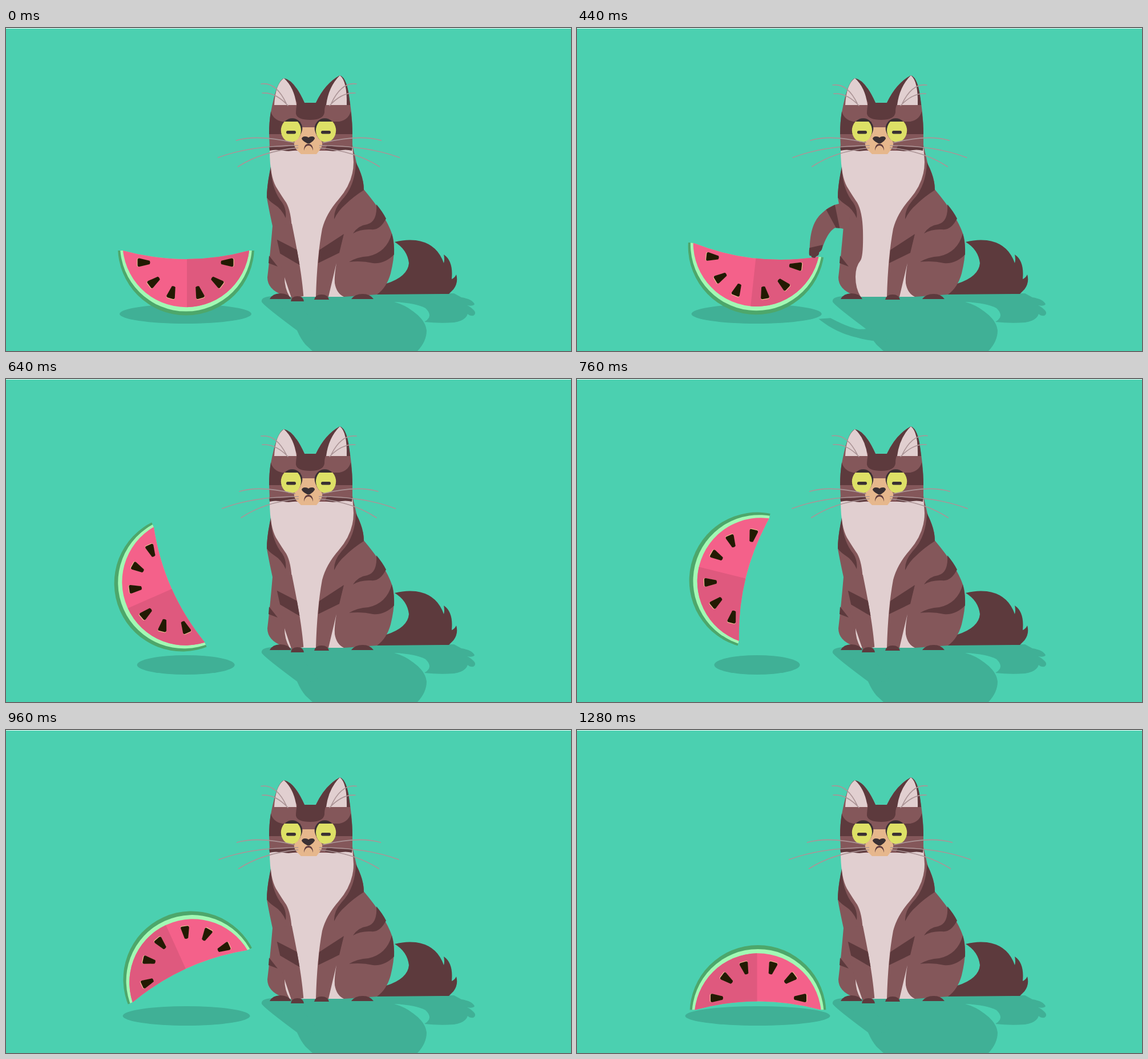
Animation of 990x566 px, one loop 1.6 s. Source, as an HTML page:

```html
<!DOCTYPE html>
<html lang="en">
<head>
<meta charset="utf-8">
<title>Cat and melon</title>
<style>
html, body { margin: 0; width: 100%; height: 100%; overflow: hidden; background: #4bd0b0; }
svg { display: block; width: 100vw; height: 100vh; }
.mid { fill: #84575a; }
.dark { fill: #5d3a3d; }
.light { fill: #e1cfd0; }
.ink { fill: #3a3033; }
.shade { fill: #40b096; }
.hair { fill: none; stroke: #ab9496; stroke-width: 1.6; stroke-linecap: round; }
</style>
</head>
<body>
<svg viewBox="0 0 990 566">
  <defs>
    <clipPath id="slice"><path d="M185 390H205Q316 420 426 390H445V510H185Z"/></clipPath>
    <clipPath id="open"><rect id="lid" x="470" width="120" height="50"/></clipPath>
    <path id="pip" d="M-11-5Q-11-7.5-8-7.5L10-3.2Q12 0 10 3.2L-8 7.3Q-11 7.5-11 5Z"/>
  </defs>
  <rect width="990" height="566" fill="#4bd0b0"/>
  <rect width="990" height="1" fill="#fff"/>

  <!-- shadows -->
  <g class="shade">
    <ellipse id="spot" cy="501" ry="17"/>
    <path d="M470 470Q446 470 448 480Q452 487 510 530Q517 546 525 555L537 566H721Q737 549 737 530Q735 512 714 497Q699 485 680 480Q719 482 735 491Q750 505 733 515Q760 518 785 516Q805 513 809 501Q813 505 819 504Q824 501 821 496Q815 489 808 486Q818 488 821 484Q817 475 798 472L785 465H650Z"/>
    <path id="armShade" transform="matrix(1.09 0 -.6 -.5 211 703)"/>
  </g>

  <g id="melon">
    <g clip-path="url(#slice)">
      <circle cx="315.5" cy="384" r="119.5" fill="#4da76b"/>
      <circle cx="315.5" cy="381" r="115.6" fill="#a2f9b4"/>
      <circle cx="315.5" cy="378" r="111.2" fill="#f4618a"/>
      <path d="M317 378V489.2A111.2 111.2 0 0 0 426.7 378Z" fill="#df597e"/>
    </g>
    <g id="seeds"></g>
  </g>

  <!-- body -->
  <path class="dark" d="M648 467L666 448Q704 436 706 412Q703 388 681 375Q700 370 718 372Q755 377 767 412Q769 406 767 397Q784 408 781 440Q786 438 789 432Q793 446 784 458L776 466Z"/>
  <path class="mid" d="M462 205L464 245Q457 275 457 297Q460 315 467 347Q463 395 458 437Q458 458 485 468L500 471H592L650 467Q667 455 674 430Q685 385 676 360Q665 328 627 283Q627 262 615 240L607 205Z"/>
  <path class="light" d="M462 205V213Q462 258 473 278Q484 296 491 306Q500 322 501 355Q502 398 497 407Q488 418 488 436Q488 456 497 471H543Q545 400 554 352Q561 325 583 300Q609 270 609 235L607 205Z"/>
  <path class="light" d="M579 412Q575 435 576 447Q579 465 592 471H565Z"/>
  <g class="dark">
    <path d="M461 399L476 418Q468 415 460 412Z"/>
    <path d="M592 361L549 389L547 412L584 394Z"/>
    <path d="M613 235Q627 262 627 284Q608 296 595 309Q582 320 575 335Q574 318 588 302Q612 277 613 235Z"/>
    <path d="M649 309Q660 322 666 334Q655 355 640 353Q621 352 608 360Q617 346 633 344Q651 339 649 309Z"/>
    <path d="M676 360Q681 380 680 397Q663 414 643 412Q622 407 601 410Q615 401 635 400Q667 393 676 360Z"/>
    <path d="M462 475Q467 465 481 465Q495 465 500 475Z"/>
    <path d="M540 476Q542 467 553 467Q564 467 566 476Z"/>
    <path d="M605 475Q611 466 625 466Q638 466 644 475Z"/>
  </g>

  <path id="arm" class="mid"/>
  <path id="stripe" class="dark"/>
  <path id="toes" class="dark" d="M499 479Q500 470 511 470Q521 470 522 479Z"/>
  <path id="hand" class="dark" d="M-10-11Q0-12 4-7Q10-8 12-3Q16-2 15 2Q15 5 12 6Q14 9 9 10Q4 11-1 11Z"/>
  <path class="dark" d="M464 243Q457 275 457 297Q461 303 470 309Q483 317 490 333Q492 318 484 306Q465 283 464 243Z"/>

  <!-- head -->
  <path class="mid" d="M461 185Q461 165 464 148Q474 92 487 88Q505 91 523 131H543Q559 97 585 83Q596 88 600 115Q607 150 607 185V208Q590 216 560 215H500Q475 215 462 211Z"/>
  <path class="dark" d="M487 88Q505 91 523 131H543Q559 97 585 83Q599 87 603 135H560Q558 140 558 148Q556 161 533 161Q510 161 508 150Q508 142 510 131Z"/>
  <g id="cheek" class="dark">
    <path d="M464 146Q468 161 484 164H516V186H461Q461 165 464 146Z"/>
    <path d="M461 207Q482 212 505 205L509 213Q500 217 487 215Q472 212 462 215Z"/>
  </g>
  <use href="#cheek" transform="matrix(-1 0 0 1 1068 0)"/>
  <path class="light" d="M470 135Q472 98 487 88Q505 104 509 135Z"/>
  <path class="light" d="M561 135Q565 103 585 83Q598 93 597 135Z"/>
  <path d="M518 174H542Q541 191 552 197Q557 203 551 212L544 221H517L508 212Q502 203 507 197Q519 191 518 174Z" fill="#e6b78c"/>
  <g id="eye">
    <circle class="ink" cx="501.500" cy="176" r="17.8"/>
    <ellipse cx="499.4" cy="179.500" rx="17.6" ry="20.5" fill="#dde066" clip-path="url(#open)"/>
    <rect class="ink" x="491" y="180" width="17" height="5.4" rx="2.7"/>
  </g>
  <use href="#eye" transform="matrix(-1 0 0 1 1060 0)"/>
  <path class="ink" d="M518 194Q519 190 524 190Q528 190 530 192Q532 190 536 190Q541 190 541 194Q538 199 534 201Q530 204 526 201Q520 198 518 194Z"/>
  <path class="dark" d="M522 215Q522 203 530 203Q538 203 538 215Q536 206 530 206Q524 206 522 215Z"/>

  <!-- whiskers -->
  <g class="hair">
    <g id="whiskers">
      <path id="side" d="M-25 201Q-90 186-127 197M-19 206Q-102 206-159 227M-19 210Q-82 216-124 243"/>
      <use href="#side" transform="scale(-1 1)"/>
    </g>
    <g transform="translate(492 135)"><path id="tuft" d="M-45-37Q-19-41-1-3M-43-21Q-20-23 2 1"/></g>
    <use href="#tuft" transform="matrix(-1 0 0 1 569 135)"/>
  </g>
</svg>
<script>
const $ = id => document.getElementById(id);
const set = (id, attr, value) => $(id).setAttribute(attr, value);
const LOOP = 1600, STEP = 40;
const HIT = 400, LAND = 1120;

const mix = (a, b, k) => a + (b - a) * k;
const ramp = (t, a, b) => Math.min(1, Math.max(0, (t - a) / (b - a)));
const smooth = (t, a, b) => { const p = ramp(t, a, b); return p * p * (3 - 2 * p); };
const bump = p => Math.sin(Math.PI * p) ** 2;

function drawMelon(t) {
  const p = ramp(t, HIT, LAND);
  const x = mix(315.5, 317, p) - 66.5 * bump(p ** .75);
  const y = mix(446.5, 434, p) - 106.5 * bump(p ** 1.2);
  const turn = 180 * Math.sin(Math.PI / 2 * ramp(t, HIT + 10, 1190) ** 1.17);
  set('melon', 'transform', `translate(${x} ${y}) rotate(${turn}) translate(-315.5 -446.5)`);

  // The shadow shrinks in flight, then spreads past its final width on landing.
  set('spot', 'cx', 314.5 + 2 * p);
  set('spot', 'rx', 115.5 - 40.5 * smooth(t, HIT, 760)
    + 71.5 * ramp(t, 760, 1040) ** 2 - 19.5 * ramp(t, 1040, LAND));
}

// Arm centre lines as cubic control points.
const REST = [484, 345, 488, 377, 501, 425, 511, 472];
const RAISED = [478, 327, 415, 337, 389, 300, 387, 244];
const STRUCK = [478, 330, 440, 325, 425, 345, 418, 388];

// Gives a point on the limb: u runs along it, side from -1 to 1 across it.
function limb(c, up) {
  return (u, side) => {
    const w = 1 - u;
    const pos = i => w ** 3 * c[i] + 3 * w * w * u * c[i + 2] + 3 * w * u * u * c[i + 4] + u ** 3 * c[i + 6];
    const vel = i => w * w * (c[i + 2] - c[i]) + 2 * w * u * (c[i + 4] - c[i + 2]) + u * u * (c[i + 6] - c[i + 4]);
    const dx = vel(0), dy = vel(1);
    const width = 17 + 6 * u - 12.5 * u * u + 7 * up * Math.max(0, 1 - 2.5 * u);
    const r = side * width / Math.hypot(dx, dy);
    return [pos(0) + dy * r, pos(1) - dx * r];
  };
}
const poly = pts => 'M' + pts.map(p => p.map(v => v.toFixed(2)).join(' ')).join('L') + 'Z';

function drawArm(t) {
  const up = smooth(t, 0, 250) - smooth(t, 440, 560);
  const strike = smooth(t, 290, HIT);
  const c = REST.map((v, i) => mix(v, mix(RAISED[i], STRUCK[i], strike), up));
  const edge = limb(c, up), left = [], right = [];
  for (let u = 0; u <= 1; u += 1 / 32) {
    right.push(edge(u, 1));
    left.unshift(edge(u, -1));
  }
  const d = poly([...right, ...left]);
  set('arm', 'd', d);
  set('armShade', 'd', d);

  // The stripe is slanted at rest and straight when raised.
  const inner = -mix(.75, 1, up), slant = mix(.2, 0, up);
  const top = .22, end = mix(.42, .36, up);
  set('stripe', 'd', poly([edge(top, inner), edge(top + slant, 1), edge(end + slant, 1), edge(end, inner)]));

  const raised = up > .08;
  $('toes').style.display = raised ? 'none' : '';
  $('hand').style.display = raised ? '' : 'none';
  const turn = Math.atan2(c[7] - c[5], c[6] - c[4]) * 180 / Math.PI;
  set('hand', 'transform', `translate(${c[6]} ${c[7]}) rotate(${turn}) scale(${mix(.5, 1, up)} 1)`);
}

function drawFace(t) {
  const sway = bump(ramp(t, 0, LAND));
  set('whiskers', 'transform', `translate(530.5 0) scale(${1 - .047 * sway} 1)`);
  set('tuft', 'transform', `scale(${1 - .06 * bump(ramp(t, 0, 560))} ${1 - .06 * sway})`);
  set('lid', 'y', 164 + 7 * bump(ramp(t, 120, 440)));
}

// Seeds fan out around the middle of the cut, mirrored left and right.
let seeds = '';
for (let i = 0; i < 3; i++) {
  const a = (8.5 + 30.5 * i) * Math.PI / 180, r = 73.8 - 3.3 * i;
  for (const side of [1, -1]) {
    seeds += `<g transform="translate(314.5 400) scale(${side} 1) translate(${-r * Math.cos(a)} ${r * Math.sin(a)}) rotate(${-37 * i})">
      <use href="#pip" x="-1.2" fill="#f0bf94"/><use href="#pip" fill="#231a02"/></g>`;
  }
}
$('seeds').innerHTML = seeds;

const start = performance.now();
function tick() {
  const now = (performance.now() - start) % LOOP;
  const t = Math.floor(now / STEP) * STEP;
  drawMelon(t);
  drawArm(t);
  drawFace(t);
  requestAnimationFrame(tick);
}
tick();
</script>
</body>
</html>
```
